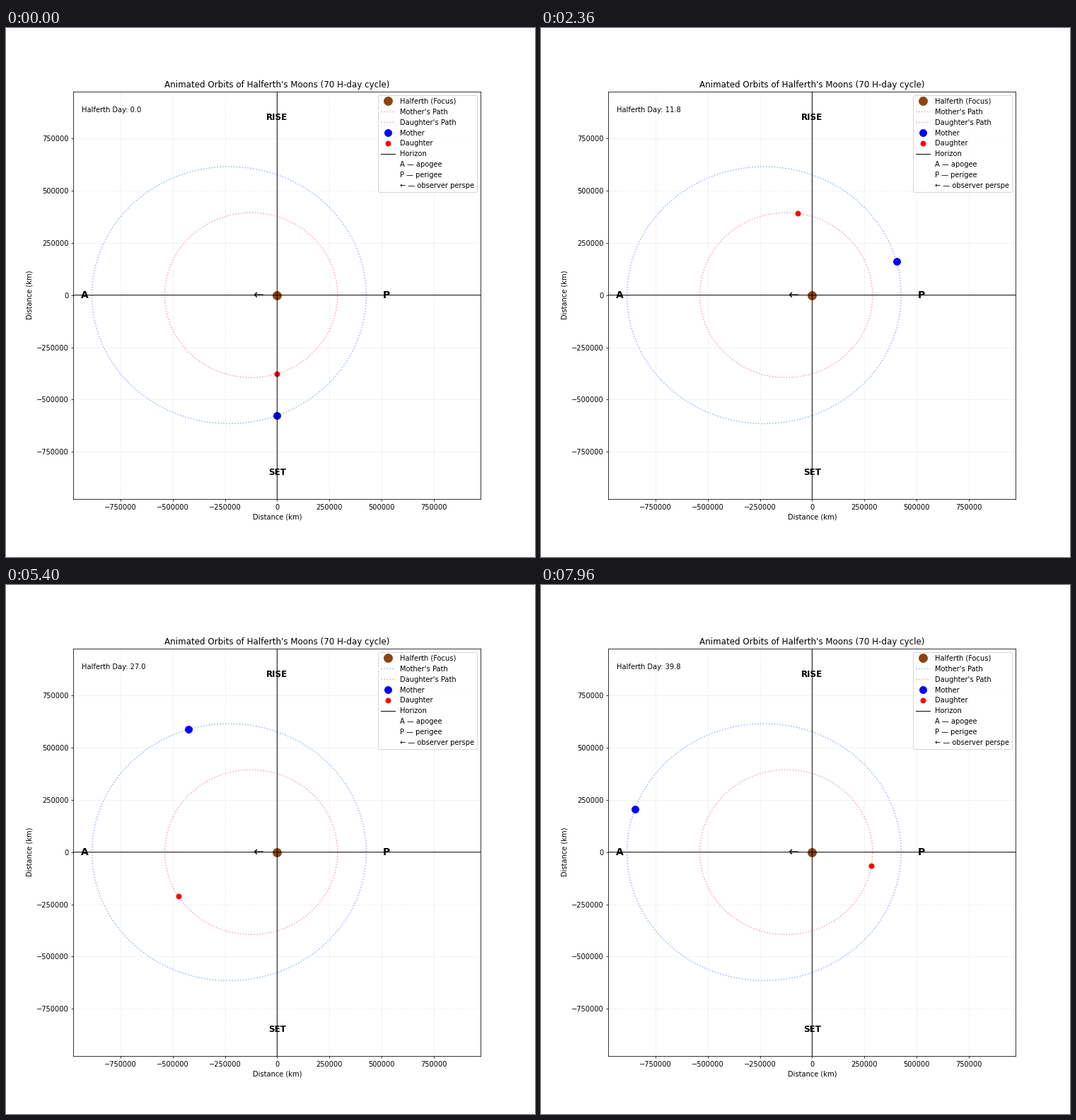
A matplotlib script that plays this animation: 748 px wide and 748 px high, repeating every 8000 ms.

```python
import numpy as np
import matplotlib.pyplot as plt
from matplotlib.animation import FuncAnimation

SIZE, INCHES = 748, 10.5
FRAMES, INTERVAL = 200, 40
DAYS_PER_FRAME = 0.2
LIMIT = 975_200


class Moon:
    """Kepler orbit with the planet at the focus and perigee on +x."""

    def __init__(self, axis, ecc, period):
        self.axis, self.ecc, self.period = axis, ecc, period
        self.minor = axis * np.sqrt(1 - ecc**2)
        # Day zero is at true anomaly -90 degrees.
        start = -2 * np.arctan(np.sqrt((1 - ecc) / (1 + ecc)))
        self.phase = start - ecc * np.sin(start)

    def point(self, ecc_anomaly):
        return (self.axis * (np.cos(ecc_anomaly) - self.ecc),
                self.minor * np.sin(ecc_anomaly))

    def at(self, day):
        mean = self.phase + 2 * np.pi * day / self.period
        anomaly = mean
        for _ in range(30):
            anomaly -= ((anomaly - self.ecc * np.sin(anomaly) - mean)
                        / (1 - self.ecc * np.cos(anomaly)))
        return self.point(anomaly)


mother = Moon(656_700, 0.35, 70)
daughter = Moon(413_700, 0.30, 35)

plt.rcParams["font.family"] = "DejaVu Sans"
fig, ax = plt.subplots(figsize=(INCHES, INCHES), dpi=SIZE / INCHES)
ax.set_aspect("equal")
ax.set_xlim(-LIMIT, LIMIT)
ax.set_ylim(-LIMIT, LIMIT)
ax.set_title("Animated Orbits of Halferth's Moons (70 H-day cycle)")
ax.set_xlabel("Distance (km)")
ax.set_ylabel("Distance (km)")
ax.grid(True, linestyle=":", alpha=0.5)

ax.plot(0, 0, "o", color="saddlebrown", markersize=12,
        label="Halferth (Focus)")
turn = np.linspace(0, 2 * np.pi, 500)
ax.plot(*mother.point(turn), ":", color="cornflowerblue", alpha=0.7,
        label="Mother's Path")
ax.plot(*daughter.point(turn), ":", color="lightcoral", alpha=0.7,
        label="Daughter's Path")
mother_dot, = ax.plot([], [], "o", color="blue", markersize=10,
                      label="Mother")
daughter_dot, = ax.plot([], [], "o", color="red", markersize=7,
                        label="Daughter")
# The cross lines lie over the planet and the moons.
ax.axhline(0, color="black", linewidth=1, snap=False, label="Horizon")
ax.axvline(0, color="black", linewidth=1, snap=False)
for note in ("A — apogee", "P — perigee", "← — observer perspe"):
    ax.plot([], [], " ", label=note)
ax.legend(loc="upper right")


def mark(x, y, text, size, weight="bold"):
    ax.text(x, y, text, fontsize=size, fontweight=weight,
            ha="center", va="center")


mark(0, 850_000, "RISE", 12)
mark(0, -850_000, "SET", 12)
mark(-920_500, 0, "A", 14)
mark(523_500, 0, "P", 14)
mark(-91_500, 0, "←", 18, "normal")
day_text = ax.text(0.02, 0.95, "", transform=ax.transAxes)


def update(frame):
    day = frame * DAYS_PER_FRAME
    for moon, dot in ((mother, mother_dot), (daughter, daughter_dot)):
        x, y = moon.at(day)
        dot.set_data([x], [y])
    day_text.set_text(f"Halferth Day: {day:.1f}")
    return mother_dot, daughter_dot, day_text


anim = FuncAnimation(fig, update, frames=FRAMES, interval=INTERVAL,
                     repeat=True, repeat_delay=0)
plt.show()
```
